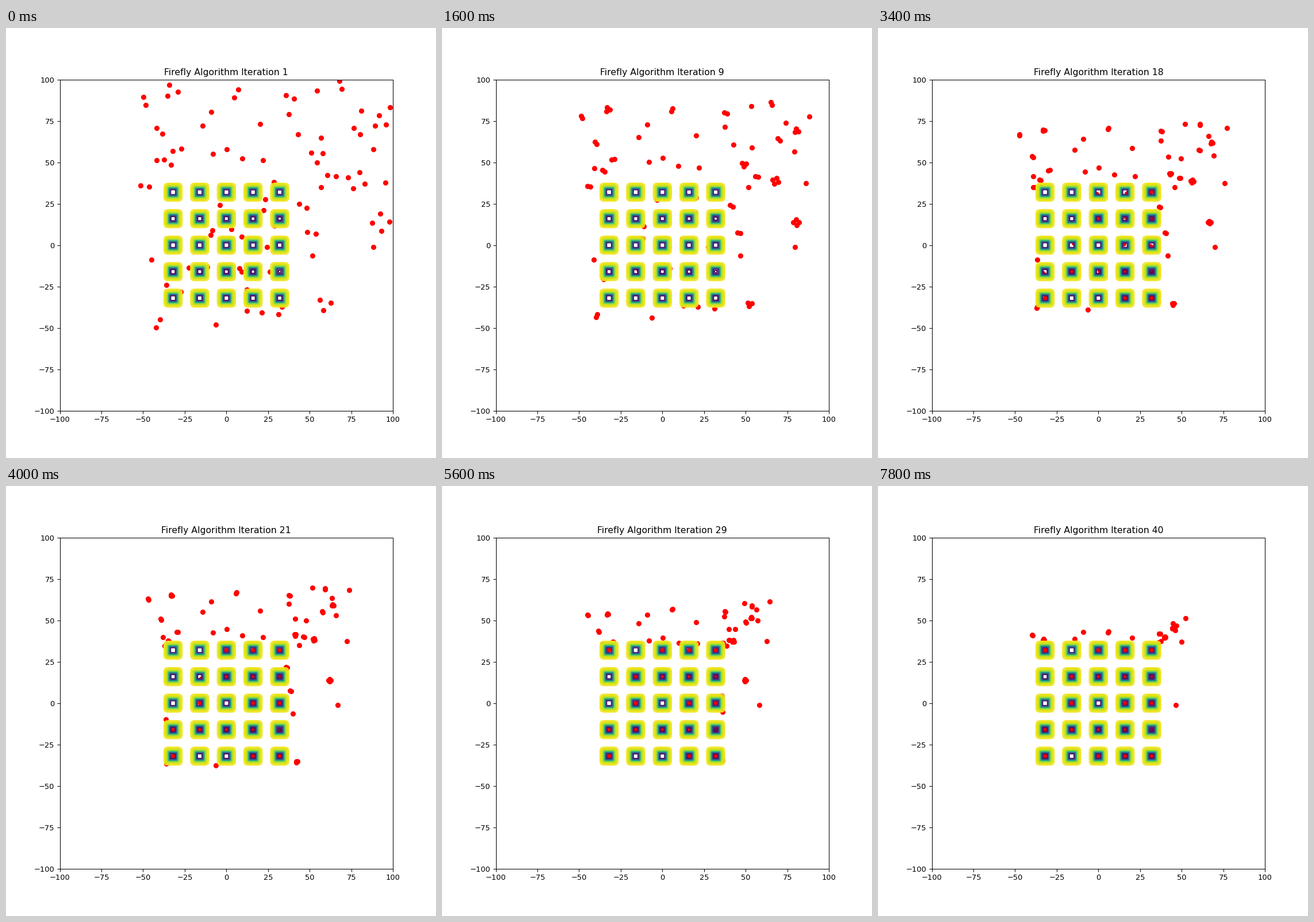
A matplotlib script for the animation above (8 s loop, 748 by 748 pixels).

```python
from itertools import product

import numpy as np
import matplotlib.pyplot as plt
from matplotlib.animation import FuncAnimation

FRAMES, STEP_MS = 40, 200
EDGE = 32     # outermost row of wells
PITCH = 16    # distance between wells
ROWS = range(-EDGE, EDGE + 1, PITCH)

# Swarm centres, by the number of fireflies in each swarm
CENTRES = {
    4: [(78, 39), (92.7, 13.8)],
    3: [(-32.9, 93.3), (54.3, 53.7), (92.3, 74.4), (59, -35.7)],
    2: [(-49.1, 87.1), (5.8, 91.6), (-40.1, 69), (-29.6, 57.7), (-35.4, 50),
        (-49, 35.6), (38.1, 89.5), (68.5, 96.8), (63.2, 41.9), (78.4, 68.8),
        (51.1, 7.4), (45.9, 23.7), (-41.1, -47.3)],
    1: [(-9.1, 80.5), (-14.3, 72.1), (-7.9, 55.1), (0.2, 57.9), (9.5, 52.5),
        (21.8, 51.3), (20.1, 73.2), (37.5, 79.1), (54.4, 93.3), (43, 67.1),
        (56.8, 64.9), (56.8, 35), (95.6, 37.6), (88.2, 57.9), (81, 81),
        (98.2, 83.2), (-42, 51.3), (51.5, -6.3), (88.2, -1.1), (-45, -8.6),
        (-6.3, -48), (-3.9, 24.2), (-36, -23.9), (12.3, -39.7),
        (21.1, -40.7), (31.4, -41.7), (-8.3, 8.9), (-9.3, 6.3),
        (-22.4, -13.5), (-11.5, -13.3), (-27.4, -28.2)],
}


def foxholes(x, y):
    total = 0.002
    for j, (b, a) in enumerate(product(ROWS, ROWS)):
        total = total + 1 / (j + 1 + (x - a) ** 6 + (y - b) ** 6)
    return 1 / total


def goal(p):
    """Nearest point of the field of wells, or the nearest well once there."""
    shore = np.clip(p, -EDGE, EDGE)
    if np.abs(p - shore).max() > 5:
        return shore
    return np.clip(PITCH * np.round(p / PITCH), -EDGE, EDGE)


def path(start, size):
    """Constant speed, mostly along the longer axis of the way to the goal."""
    p = np.array(start, float)
    speed = 0.31 + 0.0135 * np.linalg.norm(goal(p) - p)
    speed *= 1 + 0.12 * (size - 1)
    points = []
    for _ in range(FRAMES):
        points.append(p)
        way = goal(p) - p
        dist = np.linalg.norm(way)
        if dist > 1e-6:
            pull = np.sign(way) * (np.abs(way) / dist) ** 2.5
            p = p + min(speed, dist) * pull / np.linalg.norm(pull)
    return np.array(points)


def ring(radius, angle):
    return radius * np.stack([np.cos(angle), np.sin(angle)], axis=-1)


def swarm(centre, size):
    """A ring of fireflies that closes up on its moving centre."""
    angle = rng.uniform(0, 2 * np.pi) + 2 * np.pi * np.arange(size) / size
    mates = ring(1.3 * size if size > 1 else 0, angle)
    spread = 0.1 + 0.9 * np.exp(-np.arange(FRAMES) / 6)
    return path(centre, size)[:, None] + spread[:, None, None] * mates


rng = np.random.default_rng(4)
swarms = [swarm(c, size) for size, group in CENTRES.items() for c in group]

# One firefly beside each of the eastern wells
for a, b in product((0, 16, 32), ROWS):
    if a or abs(b) == PITCH:
        offset = ring(rng.uniform(5, 9), rng.uniform(0, 2 * np.pi))
        swarms.append(swarm((a, b) + offset, 1))

tracks = np.concatenate(swarms, axis=1)

fig, ax = plt.subplots(figsize=(8, 8), dpi=93.5)
dots = ax.scatter(*tracks[0].T, color="red")
grid = np.linspace(-40, 40, 481)
X, Y = np.meshgrid(grid, grid)
ax.contour(X, Y, foxholes(X, Y), levels=np.arange(0, 501, 10), cmap="viridis")
ax.set_xlim(-100, 100)
ax.set_ylim(-100, 100)
title = ax.set_title("Firefly Algorithm Iteration 1")


def update(i):
    dots.set_offsets(tracks[i])
    title.set_text(f"Firefly Algorithm Iteration {i + 1}")
    return dots, title


anim = FuncAnimation(fig, update, frames=FRAMES, interval=STEP_MS,
                     repeat=True, repeat_delay=0)
plt.show()
```
